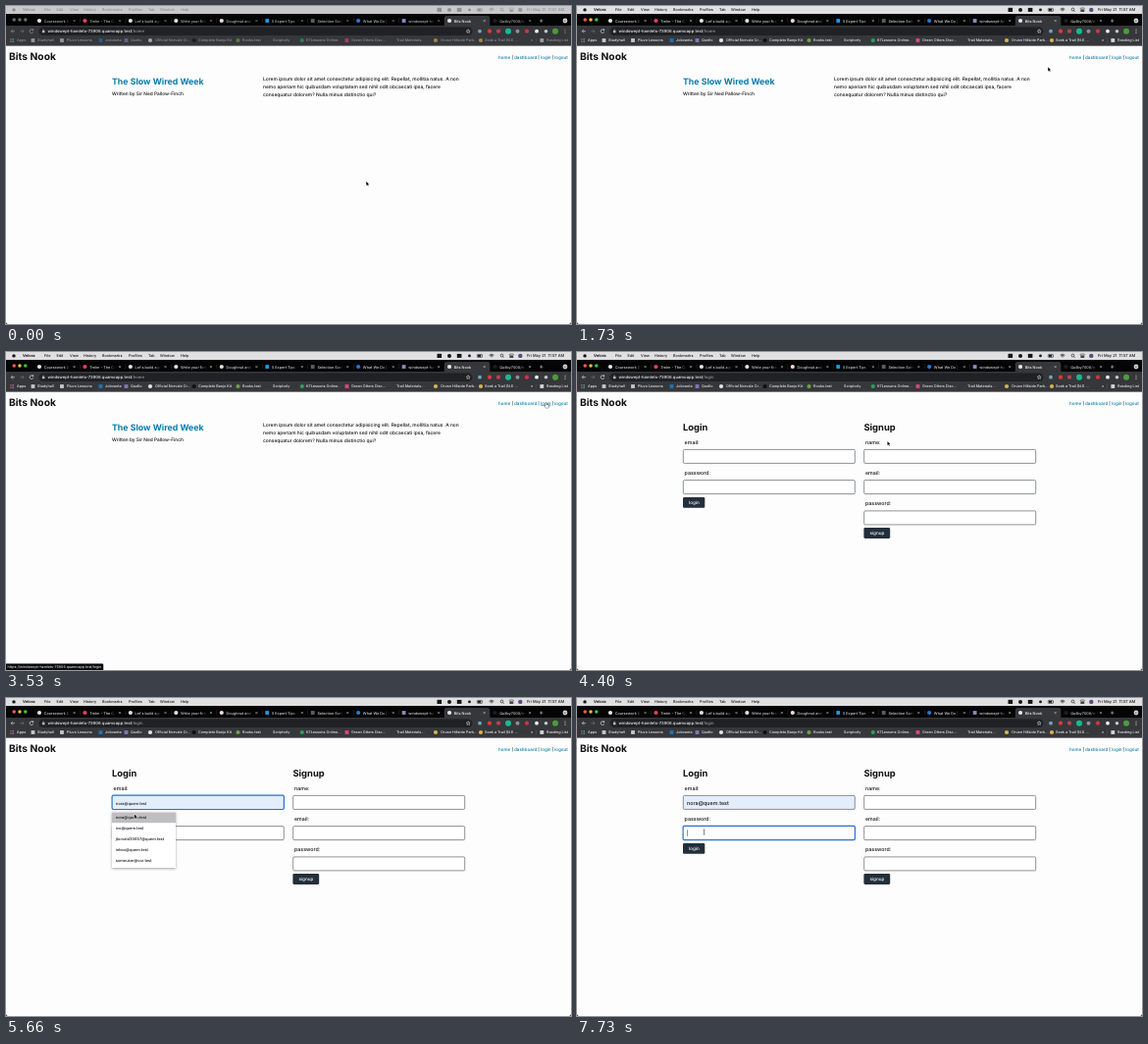
An HTML page with a canvas that plays this animation: 576 px wide and 324 px high, repeating every 8000 ms.

```html
<!DOCTYPE html>
<html lang="en">
<head>
<meta charset="utf-8">
<title>Bits Nook</title>
<style>
html, body { margin: 0; width: 100%; height: 100%; overflow: hidden; background: #fff; }
canvas { display: block; width: 576px; height: 324px; }
</style>
</head>
<body>
<canvas id="stage"></canvas>
<script>
const W = 576, H = 324, LOOP = 8000;
const canvas = document.getElementById('stage');
const dpr = window.devicePixelRatio || 1;
canvas.width = W * dpr;
canvas.height = H * dpr;
const ctx = canvas.getContext('2d');

const FONT = 'Inter, "Open Sans", sans-serif';
const LINK = '#087ca7', INK = '#111', DARK = '#232f3b';
const PAGE = '#fdfdfe', STRIP = '#040405', BAR = '#36373b';
const HOST = 'windswept-hamlets-73906.quamoapp.test';
const EMAILS = ['nora@quem.test', 'ivo@quem.test', 'jtorvald30657@quem.test', 'inbox@quem.test', 'someuser@vor.test'];

// Moments at which the state changes (ms)
const T = { active: 1260, status: 2800, login: 3730, statusOff: 3860, email: 4960, preview: 5560, filled: 5990, password: 6700 };

// Pointer stops: time, x, y
const PATH = [
  [200, 367.3, 178.8], [1000, 358.8, 66.5], [1250, 359, 65], [1860, 496, 62],
  [2600, 496, 62], [2730, 519.3, 52.8], [2900, 522, 52.6], [3200, 550.6, 52],
  [3640, 550.6, 52], [4330, 316.5, 91], [4400, 316.5, 91], [4880, 132, 106.5],
  [5260, 131, 107], [5660, 130.8, 118.4], [6260, 130.8, 118.4], [6460, 130.5, 127],
  [6600, 130.5, 127], [6800, 129.6, 136.6]
];

const NAV = [['home', 502, 13], ['dashboard', 518, 23.5], ['login', 545, 11], ['logout', 559, 14]];

const TABS = [
  ['Coursework Da', '#e6e6e6'], ['Trelm - The Co', '#e5405e'], ["Let's build a po", '#e2e2e2'],
  ['Write your first', '#e2e2e2'], ['Doughnut and P', '#f0dcdc'], ['5 Expert Tips T', '#1c9be6', 1],
  ['Selection Sort', '#5c6064', 1], ['What We Do | C', '#2878d8'], ['windswept-haml', '#9187c4', 1],
  ['Bits Nook', '#e6e6e6'], ['Quilby7000/nor', '#1d1e21']
];

// label, text x, icon x, icon colour, square?
const MARKS = [
  ['Apps', 11, 6, 'apps'], ['Studyhall', 32, 27.5, '#c8c8c8', 1], ['Pluvo Lessons', 62, 57, '#c8c8c8', 1],
  ['Jobvanta', 101, 96.5, '#1d74b8', 1], ['Quello', 127, 122.5, '#8576b8', 1],
  ['Official Norvale Cr...', 152, 147, '#e4e4e4'], ['Complete Banjo Kit', 196, 191.7, '#101010'],
  ['Rooks.test', 241, 236.5, '#6da345'], ['Scriptorly', 272], ['K7Lessons Online...', 306, 301.8, '#2ca05a'],
  ['Green Otters Disc...', 352, 347.5, '#e0457f', 1], ['Trail Materials...', 398],
  ['Orvan Hillside Park...', 443, 438, '#d9b44a'], ['Seek a Trail (N.E....', 488, 484, '#d9b44a'],
  ['»', 535], ['Reading List', 551, 546.3, '#d5d5d5', 1]
];

const MENU = [['File', 39], ['Edit', 51.5], ['View', 65], ['History', 79], ['Bookmarks', 98],
  ['Profiles', 125], ['Tab', 145], ['Window', 157], ['Help', 178]];

const EXTENSIONS = [[483, '#6fa6b8', 1.9], [493, '#d63c3c', 2.1], [502, '#b6454b', 2.1], [512, '#18b98f', 3],
  [521.5, '#8d9094', 2], [531, '#d0353d', 2.1], [541, '#eeeeee', 1.9], [550.5, '#c4c6c8', 1.8], [560, '#4d9b3d', 3]];

function rect(x, y, w, h, fill) {
  ctx.fillStyle = fill;
  ctx.fillRect(x, y, w, h);
}

function round(x, y, w, h, r, fill, stroke, line = 0.7) {
  ctx.beginPath();
  ctx.roundRect(x, y, w, h, r);
  if (fill) { ctx.fillStyle = fill; ctx.fill(); }
  if (stroke) { ctx.strokeStyle = stroke; ctx.lineWidth = line; ctx.stroke(); }
}

function dot(x, y, r, fill) {
  ctx.beginPath();
  ctx.arc(x, y, r, 0, Math.PI * 2);
  ctx.fillStyle = fill;
  ctx.fill();
}

function icon(x, y, fill, square) {
  if (square) rect(x - 1.9, y - 1.9, 3.8, 3.8, fill);
  else dot(x, y, 2.1, fill);
}

function lines(points, color, width = 0.6, close) {
  ctx.beginPath();
  for (let i = 0; i < points.length; i += 2) ctx.lineTo(points[i], points[i + 1]);
  if (close) ctx.closePath();
  ctx.strokeStyle = color;
  ctx.lineWidth = width;
  ctx.stroke();
}

// Text is laid out large and scaled down so that small sizes keep exact spacing. y is the middle of the capitals.
function text(s, x, y, size, color = INK, weight = 500) {
  ctx.save();
  ctx.translate(x, y + size * 0.36);
  ctx.scale(0.1, 0.1);
  ctx.font = `${weight} ${size * 10}px ${FONT}`;
  ctx.textRendering = 'geometricPrecision';
  ctx.fillStyle = color;
  ctx.fillText(s, 0, 0);
  const width = ctx.measureText(s).width / 10;
  ctx.restore();
  return width;
}

function drawMenu(active) {
  const ink = active ? '#151515' : '#8e8e90';
  rect(0, 0, W, 8, active ? '#e0e0e2' : '#c8c8ca');
  dot(8, 3.9, 1.7, ink);
  text('Velora', 17, 3.9, 4, ink, 700);
  for (const [label, x] of MENU) text(label, x, 3.9, 3.8, ink);
  rect(439.5, 1.8, 4.6, 4.2, ink);
  dot(452, 3.9, 2, ink);
  rect(459.8, 1.9, 4.6, 4, ink);
  dot(472.5, 3.9, 1.4, ink);
  round(480.3, 2.4, 5.2, 3, 0.8, null, ink, 0.6);
  rect(481, 3, 3.2, 1.8, ink);
  for (const r of [1.2, 2.4, 3.5]) {
    ctx.beginPath();
    ctx.arc(495, 5.8, r, -Math.PI * 0.75, -Math.PI * 0.25);
    ctx.strokeStyle = ink;
    ctx.lineWidth = 0.65;
    ctx.stroke();
  }
  ctx.beginPath();
  ctx.arc(505.5, 3.5, 1.4, 0, Math.PI * 2);
  ctx.stroke();
  lines([506.5, 4.5, 507.7, 5.8], ink);
  round(513.2, 2, 4.2, 1.5, 0.7, null, ink, 0.5);
  round(513.2, 4.2, 4.2, 1.5, 0.7, ink);
  dot(524.3, 3.9, 2.2, active ? '#5a4a7d' : '#99939f');
  text('Fri May 21  11:57 AM', 531, 3.9, 4, ink);
}

function drawTabs(active) {
  rect(0, 8, W, 12.5, STRIP);
  const lights = active ? ['#fc5b57', '#f5bd3b', '#35c84a'] : ['#6c6c6e', '#6c6c6e', '#6c6c6e'];
  lights.forEach((c, i) => dot(8.2 + i * 5.8, 14, 1.75, c));
  TABS.forEach(([label, color, square], i) => {
    const x = 34 + i * 46.45, on = i === 9;
    const back = on ? BAR : STRIP;
    if (on) round(x - 5.3, 10, 46.6, 12, [2.5, 2.5, 0, 0], back);
    else if (i !== 8 && i < 10) rect(x + 41.3, 12.3, 0.4, 5, '#3c3d41');
    icon(x, 15, color, square);
    ctx.save();
    ctx.beginPath();
    ctx.rect(x + 4, 10, 27, 10);
    ctx.clip();
    text(label, x + 4.7, 15.2, 3.8, on ? '#f1f1f1' : active ? '#d0d2d5' : '#b4b6ba');
    ctx.restore();
    const fade = ctx.createLinearGradient(x + 25, 0, x + 31, 0);
    fade.addColorStop(0, back + '00');
    fade.addColorStop(1, back);
    rect(x + 25, 11, 6.5, 8, fade);
    const cx = x + 35.6, c = active || on ? '#d8d8da' : '#a0a0a4';
    lines([cx - 1, 14.1, cx + 1, 16.1], c, 0.5);
    lines([cx - 1, 16.1, cx + 1, 14.1], c, 0.5);
  });
  lines([544, 15.1, 547.4, 15.1], '#c9cacc');
  lines([545.7, 13.4, 545.7, 16.8], '#c9cacc');
  dot(570, 15, 2.4, '#d0d1d3');
  lines([568.9, 14.6, 570, 15.7, 571.1, 14.6], '#222');
}

function drawToolbar(active, path) {
  const ink = active ? '#e4e5e7' : '#9a9ca0', dim = '#77797d';
  rect(0, 20, W, 20.5, BAR);
  lines([9, 25.7, 5.2, 25.7], ink);
  lines([6.9, 24, 5.2, 25.7, 6.9, 27.4], ink);
  lines([14.3, 25.7, 18.1, 25.7], dim);
  lines([16.4, 24, 18.1, 25.7, 16.4, 27.4], dim);
  ctx.beginPath();
  ctx.arc(26, 25.7, 1.8, 0.3, 5.5);
  ctx.strokeStyle = ink;
  ctx.lineWidth = 0.65;
  ctx.stroke();
  rect(26.8, 23.6, 1.3, 1.3, ink);

  round(33.5, 21.4, 442, 8.6, 4.3, '#202124');
  rect(36.9, 25.2, 2.6, 2, '#c0c2c5');
  round(37.5, 23.8, 1.4, 2, 0.7, null, '#c0c2c5', 0.45);
  const w = text(HOST, 42.4, 25.7, 4.2, '#f0f0f1');
  text(path, 42.4 + w, 25.7, 4.2, '#96999d');
  const star = [];
  for (let i = 0; i < 10; i++) {
    const a = i * Math.PI / 5 - Math.PI / 2, r = i % 2 ? 0.9 : 2.1;
    star.push(471.2 + Math.cos(a) * r, 25.8 + Math.sin(a) * r);
  }
  lines(star, '#e4e5e7', 0.5, true);
  for (const [x, color, r] of EXTENSIONS) dot(x, 25.7, r, color);
  for (const y of [23.9, 25.7, 27.5]) dot(570, y, 0.5, ink);

  for (const [label, x, ix, color, square] of MARKS) {
    if (color === 'apps') {
      for (let i = 0; i < 9; i++) rect(ix - 1.8 + i % 3 * 1.4, 33.2 + Math.floor(i / 3) * 1.4, 0.9, 0.9, ['#d65a4e', '#5c9be6', '#58b46a'][i % 3]);
    } else if (color) {
      ctx.globalAlpha = active ? 1 : 0.65;
      icon(ix, 35, color, square);
      ctx.globalAlpha = 1;
    }
    text(label, x, 35.1, 3.75, active ? '#e6e7e9' : '#8e9094');
  }
  rect(540.5, 32.5, 0.4, 5, '#5a5b5f');
}

function drawHeader(hover) {
  rect(0, 40.5, W, H - 40.5, PAGE);
  text('Bits Nook', 3, 51.1, 10.3, INK, 700);
  for (const item of NAV) {
    const [label, x] = item;
    const w = text(label, x, 52, 4.55, LINK);
    if (item === hover) rect(x, 54.1, w, 0.5, LINK);
  }
  for (const x of [516, 542.8, 557]) rect(x, 50, 0.45, 4.6, '#333');
}

function drawPost() {
  text('The Slow Wired Week', 108, 77.1, 8.8, LINK, 700);
  text('Written by Sir Ned Pallow-Finch', 108, 88.9, 4.8);
  ['Lorem ipsum dolor sit amet consectetur adipisicing elit. Repellat, mollitia natus. A non',
    'nemo aperiam hic quibusdam voluptatem sed nihil odit obcaecati ipsa, facere',
    'consequatur dolorem? Nulla minus distinctio qui?'
  ].forEach((s, i) => text(s, 262, 74.4 + i * 7.8, 4.91));
}

function field(label, x, y, focus, fill = '#fff') {
  text(label, x + 1.6, y - 7.2, 5.3);
  if (focus) round(x + 0.1, y + 0.1, 175.3, 14.3, 1.4, fill, '#2a6fd0', 1.2);
  else round(x + 0.3, y + 0.3, 175, 14, 1.2, fill, '#5f6468', 0.7);
}

function button(label, x, y, w) {
  round(x, y, w, 10.8, 1.3, DARK);
  text(label, x + 6, y + 5.4, 4.6, '#fff');
}

function caret(x, y, since, t) {
  if ((t - since) % 1000 < 500) rect(x, y, 0.5, 6.4, '#222');
}

function drawForms(t) {
  const preview = t >= T.preview && t < T.filled, filled = t >= T.filled;
  const onPass = t >= T.password, onEmail = t >= T.email && !onPass;
  text('Login', 108, 77, 9.4, INK, 700);
  field('email:', 108, 99.1, onEmail, preview || filled ? '#e4edfb' : '#fff');
  field('password:', 108, 130.3, onPass);
  button('login', 108, 148, 22.3);
  text('Signup', 292.4, 77, 9.4, INK, 700);
  field('name:', 292.4, 99.1);
  field('email:', 292.4, 130.3);
  field('password:', 292.4, 161.6);
  button('signup', 292.4, 179.1, 26.8);

  if (preview) text(EMAILS[0], 112, 107.1, 3.95);
  let end = 112;
  if (filled) end += text(EMAILS[0], 112, 106.6, 5.4) + 0.3;
  if (onEmail && !preview) caret(end, 103.4, filled ? T.filled : T.email, t);
  if (onPass) caret(112, 134.4, T.password, t);

  if (t >= T.email && !filled) {
    ctx.save();
    ctx.shadowColor = 'rgba(0,0,0,0.35)';
    ctx.shadowBlur = 2.5 * dpr;
    ctx.shadowOffsetY = 0.6 * dpr;
    rect(108, 116.2, 65, 56.8, '#fff');
    ctx.restore();
    if (preview) rect(108, 116.5, 65, 10.7, '#bfbfc1');
    EMAILS.forEach((s, i) => text(s, 111.8, 122 + i * 10.8, 3.95));
  }
}

function drawStatus(page) {
  const url = 'https://' + HOST + '/' + page, size = 3.6;
  ctx.font = `500 ${size * 10}px ${FONT}`;
  const w = ctx.measureText(url).width / 10;
  round(0, 317.6, w + 3.6, 6.4, [0, 1.2, 0, 0], '#08080a');
  text(url, 1.6, 321, size, '#e6e7e9');
}

function pointerAt(t) {
  let a = PATH[0];
  for (const b of PATH) {
    if (t < b[0]) {
      if (a === b) break;
      const k = (t - a[0]) / (b[0] - a[0]), e = k * k * (3 - 2 * k);
      return [a[1] + (b[1] - a[1]) * e, a[2] + (b[2] - a[2]) * e];
    }
    a = b;
  }
  return [a[1], a[2]];
}

function outline(path, scale, fill, stroke) {
  const p = new Path2D(path);
  ctx.scale(scale, scale);
  ctx.lineJoin = 'round';
  ctx.strokeStyle = stroke;
  ctx.lineWidth = 0.9 / scale;
  ctx.stroke(p);
  ctx.fillStyle = fill;
  ctx.fill(p);
}

function drawPointer(x, y, kind) {
  ctx.save();
  ctx.translate(x, y);
  if (kind === 'beam') {
    lines([0, -2.4, 0, 2.4], '#222', 0.55);
    lines([-1, -2.7, 0, -2.3, 1, -2.7], '#222', 0.45);
    lines([-1, 2.7, 0, 2.3, 1, 2.7], '#222', 0.45);
  } else if (kind === 'hand') {
    outline('M-1.5 0 Q0 -1.5 1.5 0 L1.5 6 L7 7.5 Q9 8 8.7 10.5 L7.5 16 L-1 16 L-5.5 9.5 Q-5 7.5 -1.5 10 Z', 0.3, '#fff', '#333');
  } else {
    outline('M0 0 L0 13.5 L3.2 10.6 L5.4 15.6 L7.6 14.6 L5.4 9.8 L9.6 9.6 Z', 0.3, '#000', '#fff');
  }
  ctx.restore();
}

function inside(x, y, l, top, w, h) {
  return x >= l && x <= l + w && y >= top && y <= top + h;
}

function draw(t) {
  ctx.setTransform(dpr, 0, 0, dpr, 0, 0);
  const active = t >= T.active, forms = t >= T.login;
  const [x, y] = pointerAt(t);
  const hover = active && NAV.find(n => inside(x, y, n[1], 49, n[2], 6));
  const menuOpen = t >= T.email && t < T.filled;

  drawHeader(hover);
  if (forms) drawForms(t); else drawPost();
  drawMenu(active);
  drawTabs(active);
  drawToolbar(active, forms ? '/login' : '/home');
  if (t >= T.status && t < T.statusOff) drawStatus(x < 543 && !forms ? 'dashboard' : 'login');

  const overField = forms && [108, 292.4].some(l => [99, 130.3, 161.6].some((top, i) =>
    !(l === 108 && i === 2) && inside(x, y, l, top, 175.5, 14.5)));
  const overText = active && !forms && inside(x, y, 262, 71, 202, 22);
  const beam = overText || (overField && !(menuOpen && y > 116));
  drawPointer(x, y, hover ? 'hand' : beam ? 'beam' : 'arrow');

  // Rounded screen corners
  ctx.fillStyle = '#000';
  for (const cx of [0, W]) {
    const d = cx ? -1 : 1;
    ctx.beginPath();
    ctx.moveTo(cx, H - 2);
    ctx.quadraticCurveTo(cx, H, cx + d * 2, H);
    ctx.lineTo(cx, H);
    ctx.fill();
  }
}

const start = performance.now();
function tick() {
  draw((performance.now() - start) % LOOP);
  requestAnimationFrame(tick);
}
tick();
</script>
</body>
</html>
```
